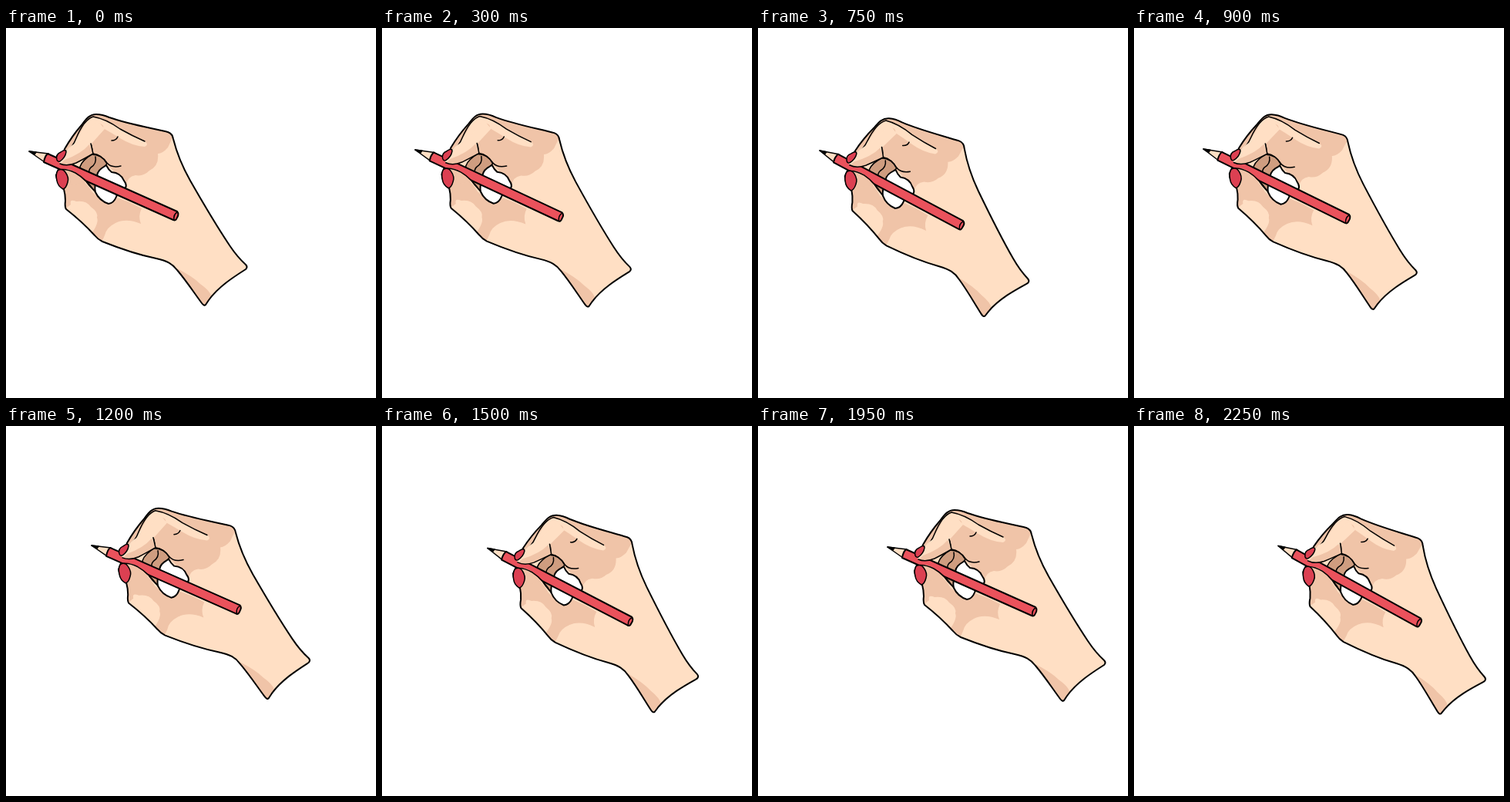
An HTML page for the animation above (2400 ms loop, 480 by 480 pixels).

```html
<!DOCTYPE html>
<html lang="en">
<head>
<meta charset="utf-8">
<title>Writing hand</title>
<style>
  html, body { margin: 0; width: 100%; height: 100%; overflow: hidden; background: #fff; }
  svg { display: block; width: 100vw; height: 100vh; }
  path { stroke-linejoin: round; stroke-linecap: round; }
  .skin { fill: #ffdfc4; }
  .shade { fill: #f0c4a8; }
  .deep { fill: #cf9d80; }
  .red { fill: #ea525c; }
  .nail { fill: #dc4052; }
  .edge { stroke: #000; stroke-width: 2; }
  .line { stroke: #000; stroke-width: 1.5; }
  .open { fill: none; }
</style>
</head>
<body>
<svg viewBox="0 0 480 480">
  <defs>
    <path id="outline" d="M76 157C84 143 91 134 98 126C104 118 108 112 117 112Q125 112 134 116C160 125 190 130 210 135Q216 137 217 144C222 164 230 182 239 198C255 226 276 261 290 282Q300 297 311 307Q314 310 311 313C297 322 276 335 263 353L259 359Q257 361 254 357C245 345 234 328 222 314C216 306 209 302 195 299C170 294 145 285 125 277Q119 274 115 269C105 258 92 246 78 235Q76 232 77 224Q77 216 75 209Q66 202 65 191L70 178Z"/>
    <clipPath id="inside"><use href="#outline"/></clipPath>
  </defs>
  <g id="hand">
    <use href="#outline" class="skin"/>
    <g clip-path="url(#inside)">
      <path class="shade" d="M72 172L78 154L104 116L117 111L219 136L210 155Q203 163 197 163Q199 179 186 185Q178 193 168 191Q157 193 156 204L135 181L113 163L110 151L128 131L118 119L105 122L88 152Z"/>
      <path class="skin" d="M113 116Q130 119 148 131L180 147Q186 151 180 154Q164 153 148 143Q137 136 126 130Q128 124 116 123Q107 134 100 142Q88 155 79 158Q95 143 103 122Z"/>
      <path class="shade" d="M70 182Q100 192 112 213L133 228L144 220L160 226L176 234Q171 244 175 254Q156 246 142 253Q130 259 128 269L124 278L110 268Q121 253 118 246Q120 239 110 232Q104 223 91 225Q82 221 84 229L74 237Z"/>
      <path class="shade" d="M220 311Q242 322 252 332Q267 343 266 349L257 362Z"/>
    </g>
    <use href="#outline" class="edge open"/>

    <path class="deep line" d="M96 180Q99 171 113 163Q124 164 131 176L118 192L117 213Q108 206 99 192Z"/>
    <path class="line open" d="M116 167Q118 176 110 181Q107 184 108 189M108 194L117 203"/>
    <path class="edge" fill="#fff" d="M130 178Q133 184 137 187Q149 188 153 198Q159 206 152 210Q144 214 143 219Q140 227 133 228Q121 224 116 213Q114 206 118 196Q117 187 124 182Z"/>
    <path class="line open" d="M110 150Q113 157 111 164Q124 164 131 175Q137 182 149 179M137 146Q143 146 145 141M113 115Q130 118 148 131Q164 140 180 147M78 160Q87 154 91 143Q101 119 113 115"/>

    <path class="skin line" d="M30 160L55 163L50 174Z"/>
    <path class="line" d="M30 160L39 161L37 164Z"/>
    <path class="red edge" d="M54 163L222 238Q225 241 222 246Q220 251 217 249L49 174Q50 167 54 163Z"/>
    <path class="line open" d="M222 239Q217 242 218 249"/>

    <path class="skin" d="M68 173L78 159Q91 144 110 146L113 163Q99 171 91 175Q78 180 70 176Z"/>
    <path class="shade" d="M76 171Q98 163 108 151L113 163Q99 171 91 175Q79 180 71 176Z"/>
    <path class="line open" d="M110 150L113 163Q99 171 91 175Q79 180 70 176"/>
    <path class="nail line" d="M66 171Q64 164 71 161Q78 156 78 161Q77 168 70 173Q67 174 66 171Z"/>
    <path class="shade" d="M70 184Q80 181 91 188L104 200L79 205Z"/>
    <path class="line open" d="M69 184Q78 182 90 188Q104 196 116 213"/>
    <path class="nail line" d="M67 185Q73 181 77 187Q82 194 80 200Q78 208 74 209Q67 205 66 198Q64 190 67 185Z"/>
  </g>
</svg>
<script>
  const STEP = 150;
  // Pencil tip x, tip y and tilt in degrees for each hop
  const poses = [
    [30, 160, 0], [35, 157.5, -3], [43, 158, 1], [52, 157, -2],
    [67, 157, 1.1], [80, 159, 4], [90, 157, 2.1], [100, 158, 0],
    [111, 155, -0.2], [123, 161, 1.2], [137, 158.5, 3.4], [149, 159, 3.5],
    [159, 158, 2.1], [168, 157, 0], [177, 157.5, 3.2], [187, 155.5, 4.8]
  ];
  const hand = document.getElementById("hand");
  const start = performance.now();

  function draw() {
    const step = Math.floor((performance.now() - start) / STEP) % poses.length;
    const [x, y, tilt] = poses[step];
    hand.setAttribute("transform", `translate(${x} ${y}) rotate(${tilt}) translate(-30 -160)`);
    requestAnimationFrame(draw);
  }
  draw();
</script>
</body>
</html>
```
